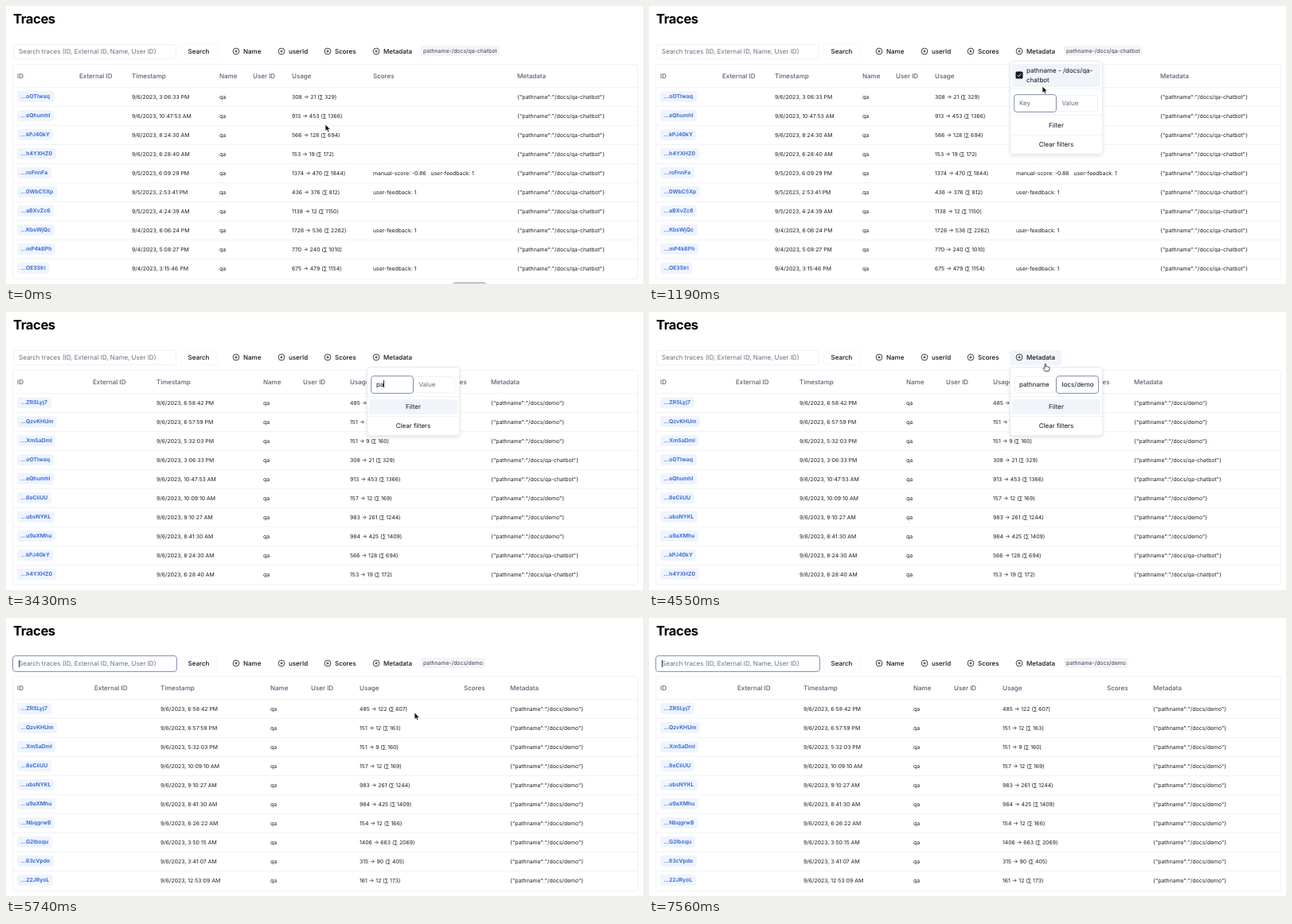
An HTML page for the animation above (7.63 s loop, 800x350 px).

```html
<!DOCTYPE html>
<html lang="en">
<head>
<meta charset="utf-8">
<style>
  html, body { margin: 0; width: 100%; height: 100%; overflow: hidden; background: #fff; }
  #stage { position: relative; width: 800px; height: 350px; overflow: hidden; font: 6.9px/16px Inter, sans-serif; color: #1d1f24; text-rendering: geometricPrecision; }
  #stage span, #stage div, #stage svg { position: absolute; box-sizing: border-box; white-space: pre; }
  #stage span { margin-top: -8px; }
  .title { font-size: 16.6px; font-weight: 700; letter-spacing: -.42px; color: #000; }
  .head { font-size: 8px; font-weight: 500; color: #566173; }
  .label { font-size: 8px; font-weight: 500; color: #0f1320; }
  .hint { font-size: 8px; color: #667080; }
  .item { font-size: 8px; color: #0f1320; }
  .mid { width: 117px; text-align: center; }
  .id { font-weight: 600; color: #2460f4; }
  .id i, .tag i { font-style: normal; background: #eff4ff; border-radius: 3px; padding: 2.4px 4.6px; }
  .tag { font-size: 6.9px; color: #3c4250; }
  .tag i { background: #f3f4f8; padding: 1.7px 3px; }
  .box { border: 1px solid #eff2f6; border-radius: 3px; }
  .soft { background: #f1f5f9; border-radius: 2px; }
  .line { height: 1px; background: #f0f2f6; }
  .ring { outline: 1.2px solid #8b98c4; }
  .pop { background: #fff; border: 1px solid #e8ebf0; border-radius: 4px; box-shadow: 0 2px 4px #0f172a1c; }
  .caret { width: 1px; height: 9px; background: #444; }
  .field { display: flex; overflow: hidden; font-size: 8px; color: #0f1320; }
  .field b { flex: none; width: 1px; height: 9px; margin-top: 3px; background: #222; }
</style>
</head>
<body>
<div id="stage">
  <div id="page"></div>
  <svg id="arrow" width="12" height="14" viewBox="-1 -1 12 14"><path d="M0 0V8.6L2 6.8 3.4 9.8 4.9 9.1 3.6 6.2H6.3Z" fill="#111" stroke="#fff" stroke-width=".7"/></svg>
  <svg id="hand" width="12" height="14" viewBox="-4 -1 12 14"><path d="M-1 5V.8Q-.3-.4.5.8V3.6Q1.5 3 2 4 3 3.4 3.5 4.4 5 4 5 5.2 5.2 7.4 4.2 9.4H-.8Q-1.4 7.6-3.2 6.2-2.8 4.8-1 6Z" fill="#fff" stroke="#222" stroke-width=".8"/></svg>
</div>
<script>
const LOOP = 7630;
const CLEARED = 1610, FILTERED = 5460;

// id, date, time, input tokens, output tokens, page, scores
const traces = `ZRSLyj7|9/6|6:58:42 PM|485|122|demo
QzvKHUm|9/6|6:57:59 PM|151|12|demo
XmSaDmI|9/6|5:32:03 PM|151|9|demo
oOTIwaq|9/6|3:06:33 PM|308|21|qa-chatbot
eQhumhI|9/6|10:47:53 AM|913|453|qa-chatbot
8eCiiUU|9/6|10:09:10 AM|157|12|demo
ubsNYKL|9/6|9:10:27 AM|983|261|demo
u9aXMhu|9/6|8:41:30 AM|984|425|demo
kPJ40kY|9/6|8:24:30 AM|566|128|qa-chatbot
h4YXHZ0|9/6|6:28:40 AM|153|19|qa-chatbot
NbqgrwB|9/6|6:26:22 AM|154|12|demo
G2Iboqu|9/6|3:50:15 AM|1406|663|demo
63cVpde|9/6|3:41:07 AM|315|90|demo
22JRyoL|9/6|12:53:09 AM|161|12|demo
roFnnFa|9/5|6:09:29 PM|1374|470|qa-chatbot|manual-score: -0.86   user-feedback: 1
0WbC5Xp|9/5|2:53:41 PM|436|376|qa-chatbot|user-feedback: 1
aBXvZc6|9/5|4:24:39 AM|1138|12|qa-chatbot
KbsWjQc|9/4|6:06:24 PM|1726|536|qa-chatbot|user-feedback: 1
mP4k6Ph|9/4|5:08:27 PM|770|240|qa-chatbot
OE3SIri|9/4|3:15:46 PM|675|479|qa-chatbot|user-feedback: 1`.split('\n').map(row => row.split('|'));

const heads = ['ID', 'External ID', 'Timestamp', 'Name', 'User ID', 'Usage', 'Scores', 'Metadata'];
const columns = {
  'qa-chatbot': [14, 92, 158, 268, 310, 359, 461, 642],
  '': [14, 109, 189, 323, 373, 432, 552, 609],
  demo: [14, 111, 194, 332, 383, 444, 575, 633],
};

const text = (x, y, s, cls = '') => `<span class="${cls}" style="left:${x}px;top:${y}px">${s}</span>`;
const rect = (x, y, w, h, cls, inner = '', css = '') =>
  `<div class="${cls}" style="left:${x}px;top:${y}px;width:${w}px;height:${h}px;${css}">${inner}</div>`;
const line = (x, y, w) => rect(x, y, w, 1, 'line');
const between = (t, a, b) => t >= a && t < b;

function table(page) {
  const x = columns[page];
  const rows = traces.filter(r => !page || r[5] === page).slice(0, 10);
  return rect(8, 73, 786, 271, 'box') +
    heads.map((h, i) => text(x[i], 88, h, 'head')).join('') +
    rows.map(([id, day, time, input, output, path, scores = ''], i) => {
      const y = 114.5 + 24 * i;
      return line(9, y - 12.5, 784) +
        text(x[0], y, `<i>...${id}</i>`, 'id') +
        text(x[2], y, `${day}/2023, ${time}`) +
        text(x[3], y, 'qa') +
        text(x[5], y, `${input} → ${output} (∑ ${+input + +output})`) +
        text(x[6], y, scores) +
        text(x[7], y, `{"pathname":"/docs/${path}"}`);
    }).join('');
}

function toolbar(page, t) {
  const focus = t >= FILTERED;
  const hover = between(t, 560, 900) || between(t, 4450, 4830);
  const buttons = [['Name', 289], ['userId', 346], ['Scores', 404], ['Metadata', 465]];
  return text(9, 16.5, 'Traces', 'title') +
    rect(9, 48, 205, 19, 'box' + (focus ? ' ring' : '')) +
    text(16, 57, 'Search traces (ID, External ID, Name, User ID)', 'hint') +
    (focus ? rect(15.5, 53, 1, 9, 'caret') : '') +
    rect(219, 48, 47, 19, 'box', '', 'border-color:#f5f7f9') + text(228.5, 57, 'Search', 'label') +
    (hover ? rect(453, 48, 65, 19, 'soft') : '') +
    buttons.map(([name, x]) =>
      `<svg style="left:${x - 5}px;top:52px" width="10" height="10" viewBox="-5 -5 10 10" fill="none" stroke="#0f1320" stroke-width=".8"><circle r="3.9"/><path d="M-1.7 0H1.7M0-1.7V1.7"/></svg>` +
      text(x + 9, 57, name, 'label')).join('') +
    (page ? text(521, 57, `<i>pathname-/docs/${page}</i>`, 'tag') : '');
}

function field(x, y, hint, value, focus, caret) {
  const align = value.length > 9 ? 'justify-content:flex-end' : '';
  return rect(x, y - 10.5, 52, 21, 'box' + (focus ? ' ring' : '')) +
    (value ? '' : text(x + 6.5, y, hint, 'hint')) +
    rect(x + 6.5, y - 8, 40, 16, 'field', value + (caret ? '<b></b>' : ''), align);
}

function popover(page, t) {
  const dy = page ? 31 : 0;
  const typed = (s, start, step) => s.slice(0, Math.max(0, Math.floor((t - start) / step)));
  const inKey = between(t, 2940, 3900), inValue = t >= 3900;
  return rect(453, 69, 117, 87 + dy, 'pop') +
    (page ? rect(456, 72.5, 111, 29, 'soft') +
      `<svg style="left:460px;top:82px" width="10" height="10"><rect x=".5" y=".5" width="9" height="9" rx="1.5" fill="#111827"/><path d="M2.8 5.1L4.4 6.7 7.4 3.4" fill="none" stroke="#fff"/></svg>` +
      text(474, 81, 'pathname - /docs/qa-', 'item') + text(474, 93, 'chatbot', 'item') +
      line(454, 104, 115) : '') +
    field(458.5, 91 + dy, 'Key', typed('pathname', 3290, 70), page || inKey, inKey) +
    field(512, 91 + dy, 'Value', typed('/docs/demo', 3920, 50), inValue, inValue && t < 4450) +
    line(454, 106 + dy, 115) +
    (page ? '' : rect(456, 110, 111, 19, 'soft')) +
    text(453, 119 + dy, 'Filter', 'item mid') +
    line(454, 131 + dy, 115) +
    text(453, 143 + dy, 'Clear filters', 'item mid');
}

// time, x, y of the pointer tip
const path = [[0, 401, 149], [150, 401, 149], [650, 486, 60], [850, 486, 60], [1190, 494.5, 101.5], [1450, 466, 87],
  [1750, 466, 87], [2100, 487, 64.5], [2600, 487, 64.5], [2900, 482, 92], [4449, 482, 92], [4450, 497.5, 64.5],
  [4800, 497.5, 64.5], [5200, 512.5, 119], [LOOP, 512.5, 119]];

function pointer(t) {
  const i = path.findIndex(p => p[0] > t);
  const [t0, x0, y0] = path[i - 1], [t1, x1, y1] = path[i];
  const u = (t - t0) / (t1 - t0), k = u * u * (3 - 2 * u);
  const isHand = between(t, 560, 950) || between(t, 2000, 2700) || between(t, 4450, 4900);
  const hidden = between(t, 3150, 4450) || t > 6400;
  for (const el of [arrow, hand]) {
    el.style.display = hidden || (el === hand) !== isHand ? 'none' : '';
    el.style.left = x0 + (x1 - x0) * k - (el === hand ? 4 : 1) + 'px';
    el.style.top = y0 + (y1 - y0) * k - 1 + 'px';
  }
}

const [pageEl, arrow, hand] = ['page', 'arrow', 'hand'].map(id => document.getElementById(id));
let shown = '';

function render(now) {
  const t = now % LOOP;
  const page = t < CLEARED ? 'qa-chatbot' : t < FILTERED ? '' : 'demo';
  const html = toolbar(page, t) + table(page) +
    (between(t, 770, FILTERED) ? popover(page, t) : '') +
    (t < 350 ? rect(561, 348, 42, 8, 'box', '', 'border-color:#999;background:#eee') : '');
  if (html !== shown) pageEl.innerHTML = shown = html;
  pointer(t);
  requestAnimationFrame(render);
}
render(performance.now());
</script>
</body>
</html>
```
